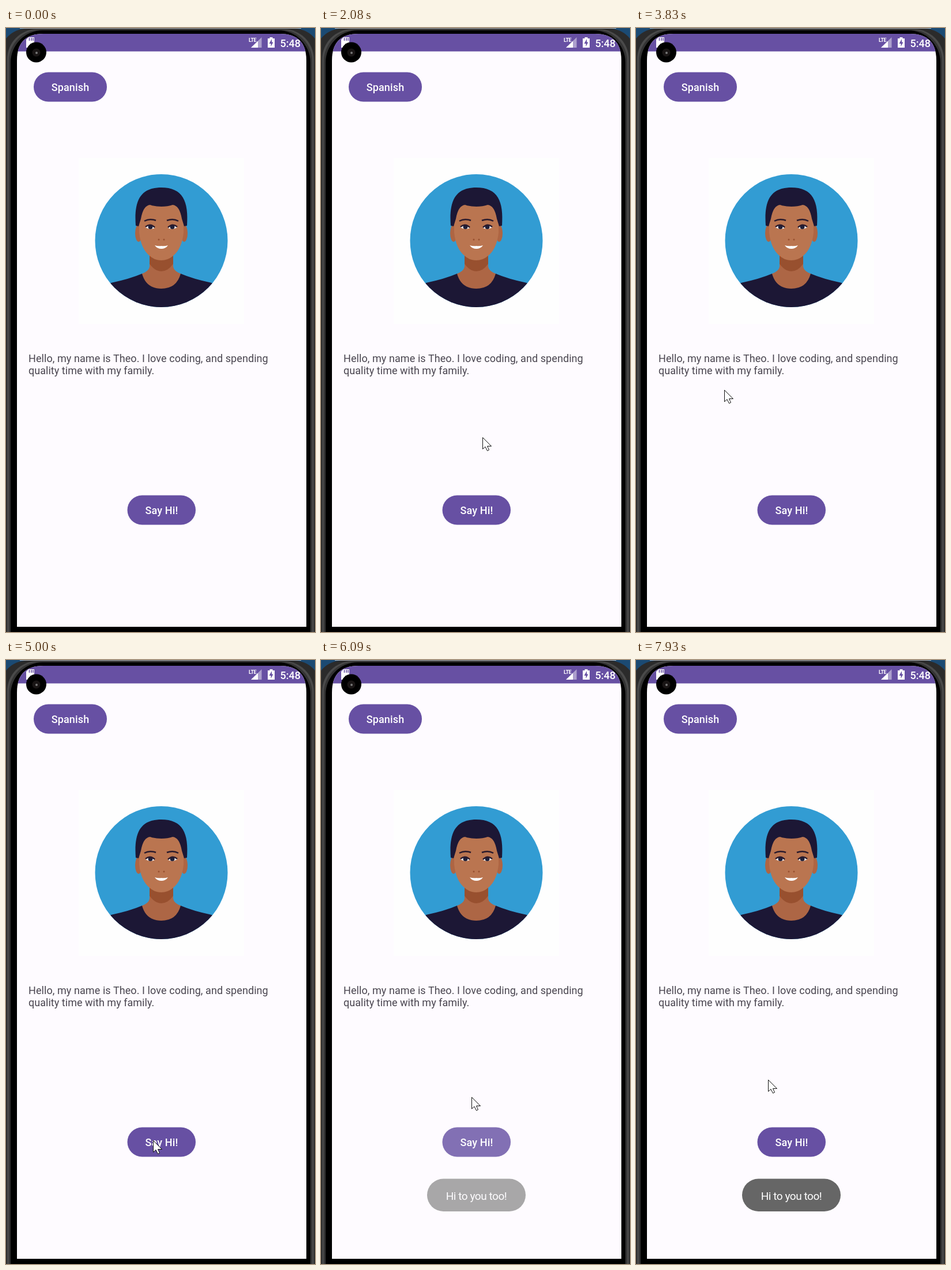
Animation, 536 px wide and 1045 px high, one loop 8000 ms. Source, as an HTML page:

```html
<!DOCTYPE html>
<html lang="en">
<head>
<meta charset="utf-8">
<title>Greeting app</title>
<style>
  html, body { margin: 0; width: 100%; height: 100%; overflow: hidden; background: #000; }
  svg { display: block; width: 100%; height: 100%; }
  text { font-family: Roboto, sans-serif; font-size: 18px; fill: #fff; }
  .label { font-weight: 500; letter-spacing: .13px; text-anchor: middle; }
  .body { fill: #49454f; letter-spacing: .08px; }
  .toast { font-size: 19px; letter-spacing: -.45px; text-anchor: middle; }
  .accent { fill: #6750a3; }
  .shirt, .hair { fill: #1c1735; }
  .skin { fill: #ba7550; }
  .shade { fill: #98502f; }
</style>
</head>
<body>
<svg viewBox="0 0 536 1045">
  <defs>
    <clipPath id="screen"><path d="M19 1036V56Q19 10 65 10H475Q521 10 521 56V1036Z"/></clipPath>
    <clipPath id="disc"><circle cx="269.5" cy="368" r="115"/></clipPath>
    <clipPath id="hiShape"><rect x="210.5" y="808.5" width="118.500" height="51" rx="25.5"/></clipPath>
  </defs>

  <!-- Phone body -->
  <rect width="536" height="1045" fill="#1b4a73"/>
  <rect x="-10" y="1" width="556" height="1100" rx="46" fill="#2b2b2b"/>
  <rect x="2" y="2" width="532" height="1100" rx="52" fill="#4a4a4a"/>
  <rect x="5" y="3" width="526" height="1100" rx="54" fill="#333"/>
  <rect x="8" y="4" width="520" height="1100" rx="56"/>
  <path d="M24 .5H512" stroke="#b9bcc0"/>

  <g clip-path="url(#screen)">
    <rect x="19" y="10" width="502" height="1026" fill="#fefbff"/>
    <rect class="accent" x="19" y="10" width="502" height="30.5"/>
    <!-- Status icons -->
    <path d="M39 16H49V34H35V20Z" fill="#fff"/>
    <path d="M40.5 17V22M44 17V22M47 17V22" stroke="#6750a3" stroke-width="1.6"/>
    <text x="421" y="24" style="font-size:9px;font-weight:700;letter-spacing:-.5px">LTE</text>
    <path d="M425 34 443.5 16V34Z" fill="#fff" opacity=".45"/>
    <path d="M425 34 437 22.5V34Z" fill="#fff"/>
    <path d="M454 18H457.5V16H462.5V18H466V34H454Z" fill="#fff"/>
    <path class="accent" d="M461 19 456.5 27H459.5V32L463.5 24.5H461Z"/>
    <text x="475.5" y="32.5" font-weight="500">5:48</text>
  </g>
  <circle cx="52.5" cy="42" r="17.5"/>
  <circle cx="52.5" cy="42.5" r="7" fill="#191515"/>
  <circle cx="53" cy="43" r="2" fill="#777"/>

  <rect class="accent" x="48" y="76.5" width="127" height="51" rx="25.5"/>
  <text class="label" x="111.5" y="108.5">Spanish</text>

  <!-- Avatar: one half, mirrored -->
  <rect x="126" y="225" width="287" height="287" fill="#fefefe"/>
  <g clip-path="url(#disc)">
    <rect x="154" y="253" width="231" height="231" fill="#329cd3"/>
    <g id="half">
      <path d="M249 385V413Q248 421 234 426V455H270V385Z" fill="#ad6645"/>
      <path class="shade" d="M249 388V408Q258 421 270 421V388Z"/>
      <path class="shirt" d="M150 490 182 441Q215 434 236 425 243 451 270 451V490Z"/>
      <ellipse cx="230" cy="355" rx="6" ry="15" fill="#ae6543"/>
      <path class="skin" d="M231 300V354Q234 382 249 394 258 402 270 402V300Z"/>
      <path class="hair" d="M225 342C222 300 232 276 270 276V309Q258 309 250 306 238 307 234 330L230 343Z"/>
      <path d="M242 345Q250 337 258 346 250 350 242 345Z" fill="#fff"/>
      <circle cx="250.5" cy="344" r="4" fill="#202039"/>
      <path d="M242 344Q250 337 258 345M240 334Q249 329 260 333" fill="none" stroke="#2a1a2c" stroke-width="2.5"/>
      <circle class="shade" cx="265" cy="366" r="1.5"/>
      <path d="M258 376Q264 378 270 377V382Q262 382 258 376Z" fill="#fff"/>
    </g>
    <use href="#half" transform="matrix(-1 0 0 1 539 0)"/>
  </g>

  <text class="body" x="39" y="578">Hello, my name is Theo. I love coding, and spending</text>
  <text class="body" x="39" y="599" style="letter-spacing:.03px">quality time with my family.</text>

  <g clip-path="url(#hiShape)">
    <rect class="accent" x="210" y="808" width="120" height="52"/>
    <circle id="ripple" cx="257" cy="832" fill="#fff" opacity="0"/>
  </g>
  <text class="label" x="270" y="841">Say Hi!</text>

  <g id="toast" opacity="0">
    <rect x="184" y="897.5" width="171" height="56.5" rx="28.25" fill="#666"/>
    <text class="toast" x="269.5" y="934">Hi to you too!</text>
  </g>

  <path id="cursor" d="M.5.5V20.5L5 16.5 8.5 23.5 11.5 22 8.5 15.5H15.5Z" fill="#fff" stroke="#111"/>
</svg>
<script>
const LOOP = 8000, TICK = 70, APPEAR = 190;
const [ripple, toast, cursor] = ["ripple", "toast", "cursor"].map(id => document.getElementById(id));

// Turning points of the hand: time, x, y
const turns = [
  [190, 520, 876], [700, 223, 487], [1310, 335, 767], [2010, 266, 703],
  [2430, 455, 770], [2780, 395, 892], [3480, 159, 680], [4110, 148, 587],
  [4430, 148, 587], [4990, 255, 831], [5620, 255, 831], [6040, 261, 756],
  [6330, 139, 688], [6810, 162, 832], [7230, 200, 683], [7930, 229, 726]
];

const progress = (t, from, to) => Math.min(1, Math.max(0, (t - from) / (to - from)));
const ease = k => k * k * (3 - 2 * k);

function pointerAt(t) {
  let [, x, y] = turns[0];
  for (let i = 1; i < turns.length; i++) {
    const k = ease(progress(t, turns[i - 1][0], turns[i][0]));
    x += (turns[i][1] - turns[i - 1][1]) * k;
    y += (turns[i][2] - turns[i - 1][2]) * k;
  }
  return [Math.round(x), Math.round(y)];
}

function draw(time) {
  const phase = time < 4300 ? 50 : 20;
  const t = Math.floor((time - phase) / TICK) * TICK + phase;
  cursor.style.display = t < APPEAR ? "none" : "";
  cursor.setAttribute("transform", `translate(${pointerAt(t)})`);
  ripple.setAttribute("r", 20 + 70 * progress(t, 5620, 5850));
  ripple.setAttribute("opacity", t < 5620 ? 0 : 0.18 * (1 - progress(t, 6060, 6300)));
  toast.setAttribute("opacity", progress(t, 5860, 6180));
}

const start = performance.now();
function frame() {
  draw((performance.now() - start) % LOOP);
  requestAnimationFrame(frame);
}
frame();
</script>
</body>
</html>
```
